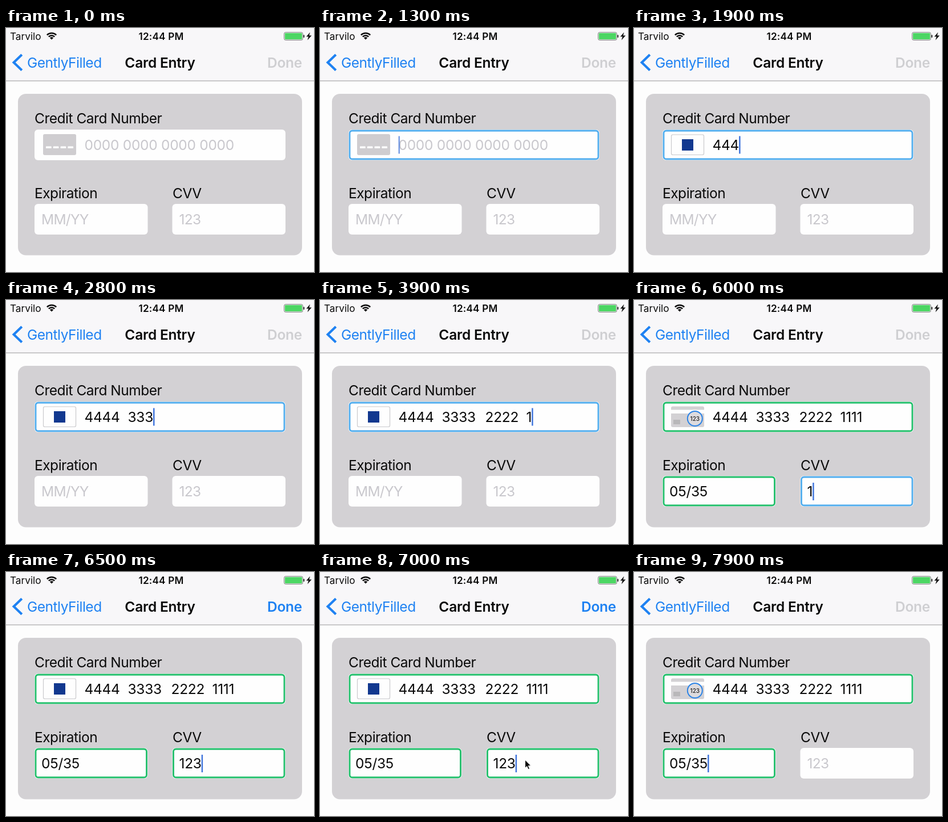
An HTML page with a canvas for the animation above (8 s loop, 540 by 430 pixels).

```html
<!DOCTYPE html>
<html lang="en">
<head>
<meta charset="utf-8">
<title>Card Entry</title>
<style>
  html, body { margin: 0; width: 100%; height: 100%; overflow: hidden; background: #fdfdfd; }
  canvas { display: block; width: 540px; height: 430px; }
</style>
</head>
<body>
<canvas id="stage"></canvas>
<script>
const W = 540, H = 430, LOOP = 8000;
const FONT = 'Inter, "Liberation Sans", sans-serif';
const BLUE = '#1f82f2', FOCUS = '#50adee', VALID = '#20bf6a';
const PANEL = '#d3d1d4', HINT = '#c9c8cd', WHITE = '#fefefe';
const DIGITS = -0.012;

const canvas = document.getElementById('stage');
const ctx = canvas.getContext('2d');
const dpr = window.devicePixelRatio || 1;
canvas.width = W * dpr;
canvas.height = H * dpr;

// Key times for each field, then the deletions.
const CARD = '4444333322221111';
const cardKeys = [1400, 1600, 1800, 2000, 2200, 2500, 2700, 2900,
                  3200, 3400, 3600, 3700, 3900, 4100, 4300, 4500];
const dateKeys = [5000, 5200, 5500, 5700];
const cvvKeys = [5900, 6200, 6400];
const deleteKeys = [7300, 7500, 7700, 7900];
const FOCUS_AT = 600;
const events = [FOCUS_AT, ...cardKeys, ...dateKeys, ...cvvKeys, ...deleteKeys];

const count = (times, t) => times.filter(k => k <= t).length;
const clamp = v => Math.max(0, Math.min(1, v));

function stateAt(t) {
  const card = CARD.slice(0, count(cardKeys, t));
  const typed = '0535'.slice(0, count(dateKeys, t));
  const date = typed.length < 2 ? typed : typed.slice(0, 2) + '/' + typed.slice(2);
  const removed = count(deleteKeys, t);
  const cvv = '123'.slice(0, Math.max(0, count(cvvKeys, t) - removed));
  let focus = '';
  if (t >= FOCUS_AT) focus = 'card';
  if (card.length === 16) focus = 'date';
  if (date.length === 5) focus = 'cvv';
  if (removed === 4) focus = 'date';
  const last = Math.max(...events.filter(e => e <= t), 0);
  return { card, date, cvv, focus, age: t - last };
}

function text(str, x, y, { size = 24.5, weight = 400, color = '#0a0a0a', align = 'left', track = -0.02 } = {}) {
  ctx.font = `${weight} ${size}px ${FONT}`;
  ctx.letterSpacing = `${track * size}px`;
  ctx.textAlign = align;
  ctx.fillStyle = color;
  ctx.fillText(str, x, y);
  return ctx.measureText(str).width;
}

function box(x, y, w, h, r, fill, stroke, line = 1) {
  ctx.beginPath();
  ctx.roundRect(x, y, w, h, r);
  if (fill) { ctx.fillStyle = fill; ctx.fill(); }
  if (stroke) { ctx.strokeStyle = stroke; ctx.lineWidth = line; ctx.stroke(); }
}

function shape(points, fill, stroke, line) {
  ctx.beginPath();
  points.forEach(([x, y]) => ctx.lineTo(x, y));
  if (fill) { ctx.closePath(); ctx.fillStyle = fill; ctx.fill(); }
  if (stroke) { ctx.strokeStyle = stroke; ctx.lineWidth = line; ctx.stroke(); }
}

function statusBar() {
  text('Tarvilo', 7, 20.5, { size: 17.2, track: 0 });
  text('12:44 PM', 272, 20.5, { size: 17.2, weight: 600, align: 'center', track: 0.01 });

  // Wi-Fi
  const a = Math.PI / 4;
  ctx.strokeStyle = '#0a0a0a';
  ctx.lineWidth = 2.5;
  for (const r of [11.5, 7.3]) {
    ctx.beginPath();
    ctx.arc(80, 20.5, r, -Math.PI / 2 - a, -Math.PI / 2 + a);
    ctx.stroke();
  }
  ctx.beginPath();
  ctx.moveTo(80, 20.5);
  ctx.arc(80, 20.5, 4.5, -Math.PI / 2 - a, -Math.PI / 2 + a);
  ctx.fillStyle = '#0a0a0a';
  ctx.fill();

  // Battery
  box(487.7, 7.7, 32.6, 13.6, 2.5, null, '#6c756e', 1);
  box(489, 9, 30, 11, 1, '#4cd663');
  box(521.3, 12, 2, 5, 1, '#333');
  shape([[533, 7.5], [526.5, 15.3], [530.3, 15.3], [528.5, 21.5], [535.8, 13.2], [531.6, 13.2]], '#111');
}

function navBar(done) {
  ctx.fillStyle = '#f8f7f9';
  ctx.fillRect(0, 0, W, 93);
  ctx.fillStyle = '#b9b8ba';
  ctx.fillRect(0, 92.5, W, 1.5);
  statusBar();
  shape([[27.8, 47], [13.6, 60.8], [27.8, 74.6]], null, BLUE, 4.2);
  text('GentlyFilled', 37, 69.5, { color: BLUE });
  text('Card Entry', 270, 69.5, { weight: 600, align: 'center', track: -0.01 });
  text('Done', 519, 69.5, { weight: 600, align: 'right', color: done ? BLUE : '#cfcfd2', track: -0.012 });
}

function icon(kind) {
  if (kind === 'blank') {
    box(65, 187, 58, 37, 3, '#cfcdd0');
    for (let i = 0; i < 4; i++) box(70 + i * 12.8, 208.5, 9.6, 3.4, 0.5, '#fff');
  } else if (kind === 'brand') {
    box(65.5, 188, 57, 35.5, 2.5, WHITE, '#c9c9cc', 1.2);
    box(84, 196, 20, 20, 0, '#12388f');
  } else {
    box(65, 187.5, 58, 6, [3, 3, 0, 0], '#d3d1d4');
    box(65, 200, 58, 24, [0, 0, 3, 3], '#d3d1d4');
    box(69, 211, 12, 8, 0, '#b9b8ba');
    ctx.beginPath();
    ctx.arc(106.8, 209, 13, 0, Math.PI * 2);
    ctx.fillStyle = '#dddbde';
    ctx.fill();
    ctx.strokeStyle = '#2b83e6';
    ctx.lineWidth = 2;
    ctx.stroke();
    text('123', 106.8, 212.6, { size: 10, weight: 500, align: 'center', color: '#222', track: 0 });
  }
}

function field(x, y, w, border) {
  box(x, y, w, 54, 6, WHITE);
  if (border) box(x + 2, y + 2, w - 4, 50, 4.5, null, border, 2.8);
}

function caret(x, y, age) {
  const p = age % 1150;
  const alpha = p < 900 ? 1 - clamp((p - 650) / 170) : clamp((p - 1050) / 100);
  ctx.globalAlpha = alpha;
  ctx.fillStyle = '#4176dc';
  ctx.fillRect(x, y, 2.5, 31);
  ctx.globalAlpha = 1;
}

// Draws the groups of four and returns the caret position.
function cardNumber(card) {
  const starts = [137.5, 213.5, 289.5, 361.5];
  let end = starts[0];
  starts.forEach((x, i) => {
    const part = card.slice(i * 4, i * 4 + 4);
    if (!part) return;
    end = x + text(part, x, 214.5, { track: DIGITS });
    if (part.length === 4 && i < 3) end = starts[i + 1];
  });
  return end;
}

function entry(value, hint, x, y) {
  if (value) return x + text(value, x, y, { track: DIGITS });
  text(hint, x, y, { color: HINT, track: -0.03 });
  return x;
}

function pointer(t) {
  if (t < 6650 || t >= 7300) return;
  const k = clamp((t - 6650) / 300);
  const e = 1 - (1 - k) ** 2;
  ctx.save();
  ctx.translate(388 - 28.5 * e, 432 - 101 * e);
  shape([[0, 0], [0, 14.5], [3.3, 11.5], [5.5, 16.8], [8, 15.8], [5.8, 10.6], [10.3, 10.4], [0, 0]],
    '#0a0a0a', '#fff', 1);
  ctx.restore();
}

function draw(t) {
  const s = stateAt(t);
  const cardOk = s.card.length === 16, dateOk = s.date.length === 5, cvvOk = s.cvv.length === 3;
  const border = (ok, name) => ok ? VALID : s.focus === name ? FOCUS : null;

  ctx.setTransform(dpr, 0, 0, dpr, 0, 0);
  ctx.fillStyle = '#fdfdfd';
  ctx.fillRect(0, 0, W, H);
  navBar(cardOk && dateOk && cvvOk);

  box(21, 116, 498, 284.5, 14, PANEL);
  text('Credit Card Number', 50, 168);
  text('Expiration', 50, 299.5);
  text('CVV', 292, 299.5);
  field(50, 179, 440, border(cardOk, 'card'));
  field(50, 310, 198.5, border(dateOk, 'date'));
  field(291.5, 310, 198.5, border(cvvOk, 'cvv'));

  icon(!s.card ? 'blank' : dateOk && !cvvOk ? 'code' : 'brand');
  if (!s.card) text('0000 0000 0000 0000', 137.5, 214.5, { color: HINT, track: DIGITS });
  const ends = {
    card: cardNumber(s.card),
    date: entry(s.date, 'MM/YY', 62, 346),
    cvv: entry(s.cvv, '123', 303.5, 346)
  };
  if (s.focus) caret(ends[s.focus], s.focus === 'card' ? 190.5 : 322, s.age);
  pointer(t);
}

const start = performance.now();
function tick() {
  draw((performance.now() - start) % LOOP);
  requestAnimationFrame(tick);
}
tick();
</script>
</body>
</html>
```
